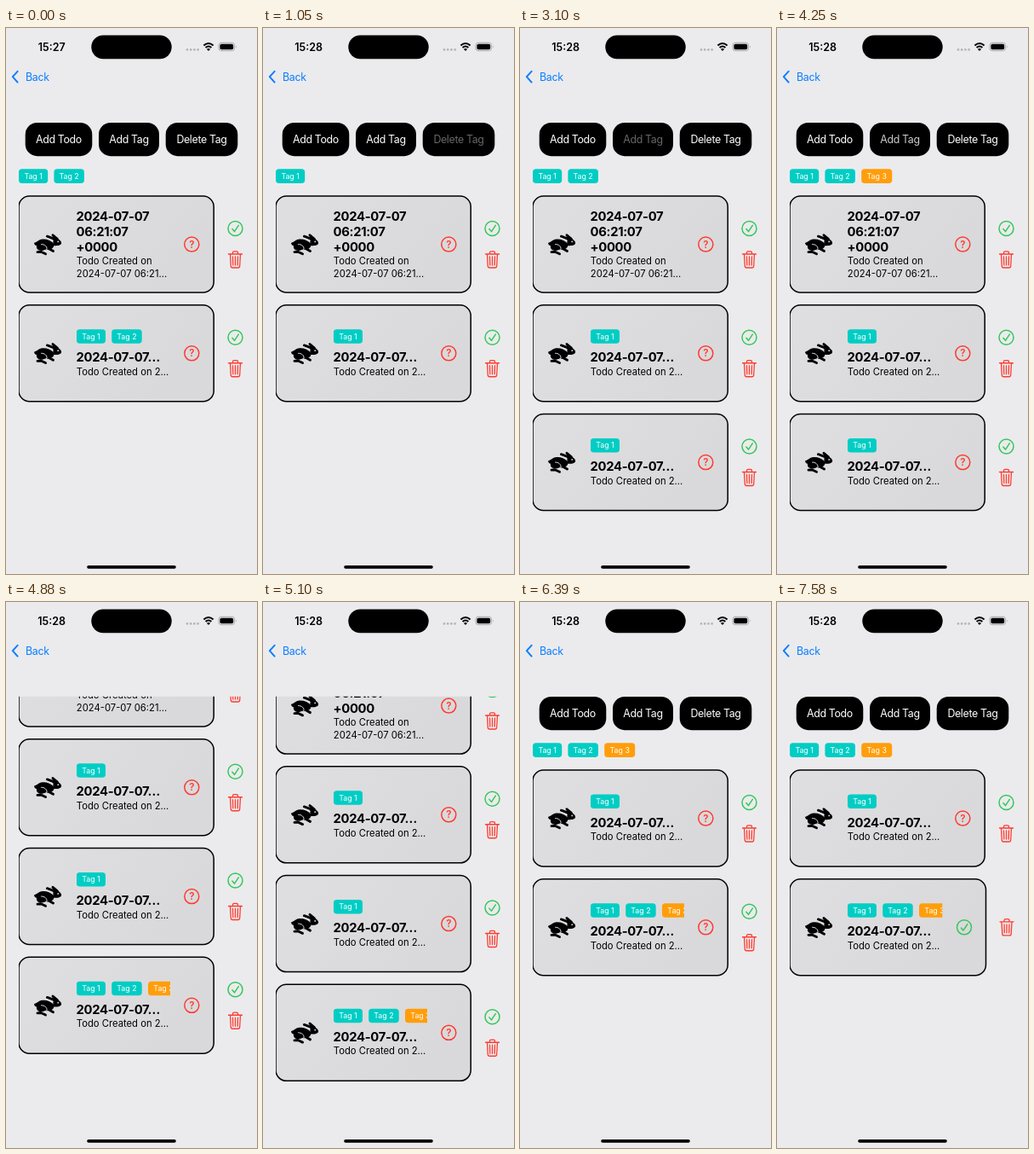
Animation of 295 by 640 pixels, one loop 8 s. Source, as an HTML page:

```html
<!DOCTYPE html>
<html lang="en">
<head>
<meta charset="utf-8">
<title>Todo list</title>
<style>
  html, body { margin: 0; width: 100%; height: 100%; overflow: hidden; background: #ebebed; }
  svg { display: block; font-family: Inter, "Liberation Sans", sans-serif; }
  .line { fill: none; stroke-linecap: round; stroke-linejoin: round; }
  .red { stroke: #ff3b30; }
  .green { stroke: #34c759; }
  .title { font-size: 14.8px; font-weight: 700; letter-spacing: -.3px; }
  .sub { font-size: 11.25px; }
  .tag { font-size: 8.8px; fill: #fff; text-anchor: middle; }
  .btn { font-size: 12.4px; letter-spacing: -.35px; fill: #fff; text-anchor: middle; }
</style>
</head>
<body>
<svg width="295" height="640" viewBox="0 0 295 640">
  <defs>
    <linearGradient id="fill" x2="1" y2=".4">
      <stop stop-color="#dfdfe1"/><stop offset="1" stop-color="#d9d9db"/>
    </linearGradient>
    <clipPath id="view"><rect x="15" y="110.8" width="265" height="466.5"/></clipPath>
    <clipPath id="tagBox"><rect x="68" y="20" width="110" height="30"/></clipPath>
    <clipPath id="tagBoxDone"><rect x="68" y="20" width="111.3" height="30"/></clipPath>
    <g id="hare">
      <path d="M18 55C21 54.5 23 51.2 28 50.6C33 50.2 37 52 41 55.5C42.5 59 40 62 36 62.6L27 64C21.5 64 20.5 60.5 21 58.2C19.5 58 18.2 57 18 55Z"/>
      <path d="M40 51.6C42 49.6 46 49.6 48 51.4C50 53 50.8 55 49.6 56.4C47.6 58.2 44 58.4 41 58Z"/>
      <g class="line" stroke="#000" stroke-width="2.9">
        <path d="M44 51.2L33.4 47.2M45.4 50.4L40 45.8"/>
        <path d="M22 65.6L26 65.2L31.5 67.8M35 61.5L40.5 64.6"/>
      </g>
      <path class="line" stroke="#dcdcde" stroke-width="1" d="M26.5 56.5C30.5 56.5 33.5 59 33 62.6L29.5 64M33 49.2L40.4 52.4"/>
      <circle cx="46.2" cy="53.4" r=".9" fill="#dcdcde"/>
    </g>
    <g id="check" class="line green" stroke-width="1.5">
      <circle r="8.5"/><path d="M-3.6 .6L-1 3.6L3.8 -3.6"/>
    </g>
    <g id="ask">
      <circle class="line red" r="8.5" stroke-width="1.5"/>
      <text y="4.1" font-size="11.5" font-weight="600" fill="#ff3b30" text-anchor="middle">?</text>
    </g>
    <path id="trash" class="line red" stroke-width="1.3" d="M-8 -6.5H8M-3 -6.8v-1.4q0 -1.5 1.5 -1.5h3q1.5 0 1.5 1.5v1.4M-6 -6.5l.8 14q.1 2 2 2h6.4q1.9 0 2 -2l.8 -14M0 -3.5v10M-3 -3.5l.3 10M3 -3.5l-.3 10"/>
  </defs>

  <rect width="295" height="640" fill="#ebebed"/>
  <g clip-path="url(#view)"><g id="scroll"><g id="buttons"></g><g id="list"></g></g></g>

  <text id="clock" x="53.7" y="26.5" font-size="12.5" font-weight="600" text-anchor="middle"></text>
  <rect x="100.3" y="8.4" width="94.4" height="27.8" rx="13.9"/>
  <g fill="#b4b4b7">
    <circle cx="213" cy="25.4" r="1.3"/><circle cx="217.2" cy="25.4" r="1.3"/>
    <circle cx="221.4" cy="25.4" r="1.3"/><circle cx="225.6" cy="25.4" r="1.3"/>
  </g>
  <path fill="none" stroke="#000" stroke-width="2" d="M232.4 20.6Q238 15.4 243.6 20.6M234.6 23.1Q238 20 241.4 23.1"/>
  <path d="M238 27L235.9 24.8Q238 23.1 240.1 24.8Z"/>
  <rect x="250" y="17.3" width="18.6" height="9.4" rx="3" fill="none" stroke="#a2a2a5" stroke-width=".9"/>
  <rect x="251.4" y="18.7" width="15.8" height="6.6" rx="1.8"/>
  <path d="M270 20.4q1.5 1.6 0 3.2z" fill="#a2a2a5"/>

  <path class="line" stroke="#0a7dff" stroke-width="2" d="M13.6 50.8L7.8 57.2L13.6 63.6"/>
  <text x="23" y="61.6" font-size="12.4" letter-spacing="-.3" fill="#0a7dff">Back</text>
  <rect x="95.2" y="629.9" width="104.6" height="3.8" rx="1.9"/>
</svg>
<script>
const LOOP = 8000, STEP = 110, PITCH = 127.75, REST = 116;
const $ = id => document.getElementById(id);

// [start, tags in the header, tags of each todo (* = done)]
const scenes = [
  [0, '12', ['', '12']],
  [940, '1', ['', '1']],
  [2120, '1', ['', '1', '1']],
  [2880, '12', ['', '1', '1']],
  [3840, '123', ['', '1', '1']],
  [4640, '123', ['', '1', '1', '123']],
  [5900, '123', ['1', '1', '123']],
  [6390, '123', ['1', '123']],
  [7580, '123', ['1', '123*']]
];

// [label, x, width]
const buttons = [['Add Todo', 22.7, 78.6], ['Add Tag', 109, 71], ['Delete Tag', 187.7, 84.6]];

// [time, button, steps held]
const taps = [[940, 2, 0], [2120, 0, 0], [2770, 1, 2], [3840, 1, 0], [4640, 0, 0]];

const text = (cls, x, y, s) => `<text class="${cls}" x="${x}" y="${y}">${s}</text>`;
const icon = (id, x, y) => `<use href="#${id}" x="${x}" y="${y}"/>`;

function tagRow(tags, x, y) {
  return [...tags].map(n => {
    const left = x + [0, 41.4, 84.2][n - 1], w = [34.2, 35.5, 36][n - 1];
    return `<rect x="${left}" y="${y}" width="${w}" height="16.6" rx="3.75" fill="${n === '3' ? '#ff9e0a' : '#00cdc4'}"/>` +
      text('tag', left + w / 2, y + 11.5, 'Tag ' + n);
  }).join('');
}

function todo(spec, i) {
  const done = spec.endsWith('*'), tags = spec.replace('*', '');
  const body = tags
    ? `<g clip-path="url(#${done ? 'tagBoxDone' : 'tagBox'})">${tagRow(tags, 67.8, 28.4)}</g>` +
      text('title', 67.5, 66.6, '2024-07-07…') + text('sub', 67.8, 82, 'Todo Created on 2…')
    : ['2024-07-07', '06:21:07', '+0000'].map((s, k) => text('title', 67.5, 29.2 + 18.1 * k, s)).join('') +
      text('sub', 67.8, 80.2, 'Todo Created on') + text('sub', 67.8, 95, '2024-07-07 06:21…');
  const side = done
    ? icon('check', 205, 56.6) + icon('trash', 255, 56.6)
    : icon('ask', 203.3, 56.6) + icon('check', 254.5, 38) + icon('trash', 254.5, 74.5);
  return `<g transform="translate(15 ${197 + PITCH * i})">
    <rect width="${done ? 230.5 : 229.2}" height="113" rx="12.5" fill="url(#fill)" stroke="#000" stroke-width="1.5"/>
    ${icon('hare', 0, 0)}${body}${side}</g>`;
}

function scrollAt(t) {
  if (t < 4760 || t >= 5900) return 0;
  if (t < 4880) return 70;
  if (t >= 5540) return REST;
  return REST + 48 * 0.577 ** Math.floor((t - 4870) / STEP);
}

function labelAlpha(t, button) {
  let alpha = 1;
  for (const [start, b, held] of taps) {
    if (b !== button || t < start) continue;
    const k = Math.max(0, Math.floor((t - start) / STEP) - held);
    alpha = Math.min(1, 0.2 + 0.2 * k);
  }
  return alpha;
}

$('buttons').innerHTML = buttons.map(([s, x, w]) =>
  `<rect x="${x}" y="111" width="${w}" height="39.2" rx="14"/>` + text('btn', x + w / 2, 135, s)).join('');
const labels = document.querySelectorAll('.btn');
let shown;

function draw(t) {
  const scene = scenes.findLast(s => s[0] <= t);
  if (scene !== shown) {
    shown = scene;
    $('list').innerHTML = tagRow(scene[1], 15, 165.3) + scene[2].map(todo).join('');
  }
  $('clock').textContent = t < 170 ? '15:27' : '15:28';
  $('scroll').setAttribute('transform', `translate(0 ${-scrollAt(t)})`);
  labels.forEach((el, i) => el.setAttribute('opacity', labelAlpha(t, i)));
}

const begin = performance.now();
function tick() {
  draw((performance.now() - begin) % LOOP);
  requestAnimationFrame(tick);
}
tick();
</script>
</body>
</html>
```
